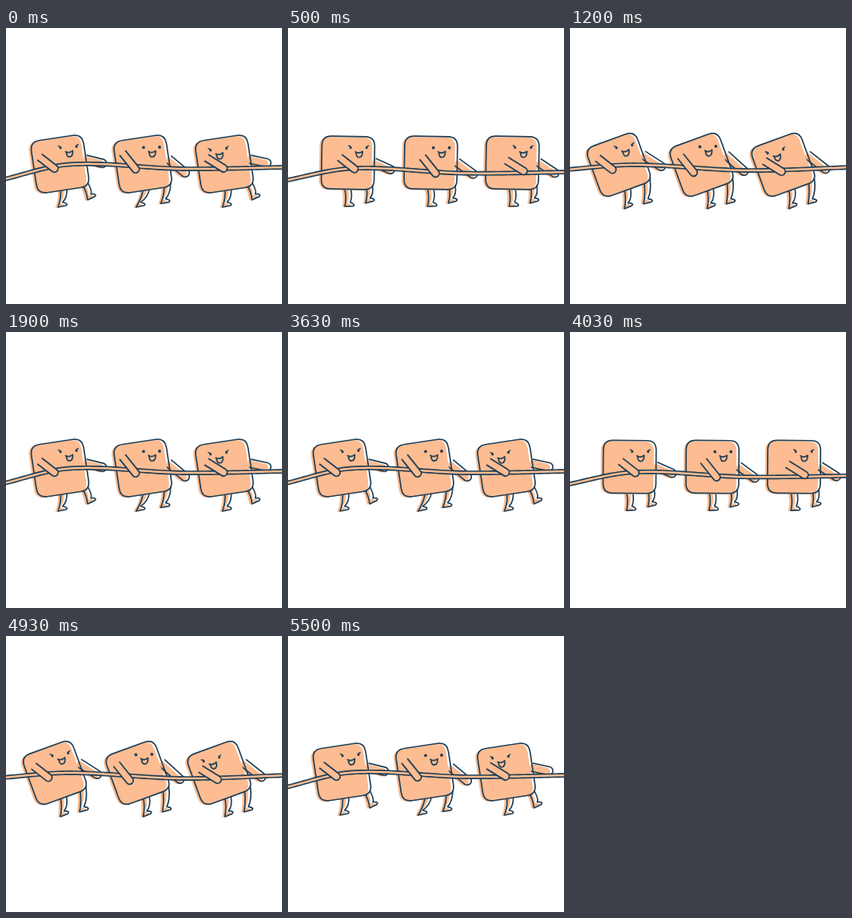
Recreate the animation shown at these times as an HTML page. Size 345 px wide and 345 px high, loop 7310 ms.

```html
<!DOCTYPE html>
<html lang="en">
<head>
<meta charset="utf-8">
<title>Tug of war</title>
<style>
html, body { margin: 0; width: 100%; height: 100%; overflow: hidden; background: #fff; }
svg { display: block; width: 100vw; height: 100vh; }
path { stroke-linecap: round; stroke-linejoin: round; }
.line { fill: none; stroke: #203f56; stroke-width: 1.7; }
.brow { fill: none; stroke: #203f56; stroke-width: 1.5; }
.fill { fill: #fdbc91; }
.arm { fill: #fdbc91; stroke: #203f56; stroke-width: 1.8; }
.dot { fill: #203f56; }
.rope { fill: none; stroke: #203f56; stroke-width: 5.8; }
.core { fill: none; stroke: #fdbc91; stroke-width: 2.5; }
</style>
</head>
<body>
<svg id="stage" viewBox="0 0 345 345"></svg>
<script>
const LOOP = 7310, STARTS = [30, 3630], PULL = 1870;

// reach: front hand ahead of the body; look: head turned back; lift: rear foot kicked up
const REST = { x: 67.5, y: 170, tilt: -8.5, reach: -7, look: 1, lift: 1, smile: 1,
  heels: [65, 224, 94, 218], rope: [191, 170.5, 176, 174] };
const FORWARD = { x: 75, y: 168.5, tilt: 1, reach: 8, look: 0, lift: 0, smile: 1,
  heels: [71, 223, 97, 219], rope: [192, 175.5, 181.5, 180] };
const TURN = { x: 66.5, y: 170, tilt: -6.5, reach: 1, look: 0.4, lift: 0, smile: 0,
  heels: [69, 225, 94, 219], rope: [186, 173, 180, 177.5] };
const LEAN = { x: 61, y: 171, tilt: -20, reach: -8, look: 0.95, lift: 0, smile: 1,
  heels: [68, 226, 92, 220], rope: [177.5, 171, 178, 174] };
const TIMES = [0, 470, 840, 1170, 1300, PULL];
const POSES = [REST, FORWARD, TURN, LEAN, LEAN, REST];
const ROPE_X = [-10, 80, 220, 355];

const CREW = [
  { x: 0, brows: true, gaze: 0, turn: 0.5, kick: 1, raise: 2, extra: 0, drop: 1, arm: [18, 14] },
  { x: 103.5, brows: false, gaze: 0, turn: 0.1, kick: -0.5, raise: -4, extra: -2, drop: 2, arm: [16, 20] },
  { x: 205.5, brows: true, gaze: 18, turn: 0.7, kick: 1, raise: 7, extra: 6, drop: -2, arm: [21, 13] }
];

const stage = document.getElementById('stage');
function add(tag, cls, parent = stage, attrs = {}) {
  const el = document.createElementNS('http://www.w3.org/2000/svg', tag);
  if (cls) el.setAttribute('class', cls);
  for (const k in attrs) el.setAttribute(k, attrs[k]);
  parent.appendChild(el);
  return el;
}
const set = (el, k, v) => el.setAttribute(k, v);

// An outline whose colour is printed slightly off to the left
function offset(parent) {
  const fill = add('path', 'fill', parent, { transform: 'translate(-3.4 1)' });
  const line = add('path', 'line', parent);
  return d => { set(fill, 'd', d); set(line, 'd', d); };
}

function spin(x, y, deg) {
  const a = deg * Math.PI / 180, c = Math.cos(a), s = Math.sin(a);
  return [x * c - y * s, x * s + y * c];
}

// Cubic curve through points, with the slope at each point given by a rule
function spline(xs, ys, x, slope) {
  let i = 0;
  while (i < xs.length - 2 && x > xs[i + 1]) i++;
  const h = xs[i + 1] - xs[i], u = (x - xs[i]) / h, w = 1 - u;
  return ys[i] * (1 + 2 * u) * w * w + ys[i + 1] * u * u * (3 - 2 * u)
    + h * (slope(xs, ys, i) * u * w * w - slope(xs, ys, i + 1) * u * u * w);
}
const rate = (xs, ys, a, b) => (ys[b] - ys[a]) / (xs[b] - xs[a]);

// Rests at every extreme, so motion never overshoots
function easy(xs, ys, i) {
  if (i === 0 || i === xs.length - 1) return 0;
  const a = rate(xs, ys, i - 1, i), b = rate(xs, ys, i, i + 1);
  return a * b > 0 ? 2 * a * b / (a + b) : 0;
}
const loose = (xs, ys, i) => rate(xs, ys, Math.max(0, i - 1), Math.min(xs.length - 1, i + 1));

function poseAt(t) {
  const mix = get => spline(TIMES, POSES.map(get), t, easy);
  const pose = {};
  for (const k in REST)
    pose[k] = Array.isArray(REST[k]) ? REST[k].map((_, j) => mix(p => p[k][j])) : mix(p => p[k]);
  return pose;
}

function capsule(x, y, X, Y, r) {
  const len = Math.hypot(X - x, Y - y), nx = (Y - y) / len * r, ny = (x - X) / len * r;
  return `M${x + nx} ${y + ny}L${X + nx} ${Y + ny}A${r} ${r} 0 0 1 ${X - nx} ${Y - ny}L${x - nx} ${y - ny}`;
}

function leg(hx, hy, fx, fy, a) {
  const at = (x, y) => { const p = spin(x, y, a); return `${fx + p[0]} ${fy + p[1]}`; };
  const kx = (hx + fx) / 2, ky = (hy + fy) / 2;
  return `M${hx - 4} ${hy}Q${kx + 1} ${ky} ${at(0, 0)}L${at(10, 0)}` +
    `Q${at(13, -1)} ${at(10.5, -3)}L${at(7, -5)}Q${kx + 8} ${ky} ${hx + 4} ${hy}`;
}

const BODY = 'M-21-33H21Q33-33 33-21V21Q33 33 21 33H-21Q-33 33-33 21V-21Q-33-33-21-33Z';

const actors = CREW.map(c => {
  const g = add('g');
  const legs = [offset(g), offset(g)], back = offset(g);
  const bodyFill = add('path', 'fill', g, { d: BODY });
  const body = add('path', 'line', g, { d: BODY });
  const face = add('g', '', g);
  for (const side of [-1, 1]) {
    const x = side * 10 - 0.5;
    add('circle', 'dot', face, { cx: x, cy: -7, r: c.brows ? 1.5 : 1.9 });
    if (c.brows) add('path', 'brow', face, { d: `M${x + side * 2.4}-9.6L${x - side * 0.6}-8` });
  }
  return { ...c, legs, back, bodyFill, body, face, mouth: add('path', 'line', face) };
});
const rope = add('path', 'rope'), core = add('path', 'core');
for (const a of actors) a.front = add('path', 'arm');

function drawActor(a, pose, ropeY) {
  const { tilt, lift } = pose, bx = pose.x + a.x, by = pose.y;
  const on = (x, y) => { const p = spin(x, y, tilt); return [bx + p[0], by + p[1]]; };

  const [x1, y1, x2, y2] = pose.heels, kick = lift * a.kick;
  a.legs[0](leg(...on(0, 31), a.x + x1 + (kick - lift) * 4, y1, tilt - 3));
  a.legs[1](leg(...on(27, 28), a.x + x2 + kick * 8, y2 - kick * 3, -15 - kick * 11));

  const kx = bx + 53, ky = ropeY(kx) + 1 - lift * a.raise;
  a.back(capsule(...on(33, -1), kx, ky, 5.2));

  set(a.bodyFill, 'transform', `translate(${bx - 3} ${by + 1}) rotate(${tilt})`);
  set(a.body, 'transform', `translate(${bx} ${by}) rotate(${tilt})`);

  const [mx, my] = on(13.5 - a.gaze * pose.look, -12);
  set(a.face, 'transform', `translate(${mx} ${my}) rotate(${tilt * a.turn})`);
  const open = a.gaze ? pose.smile : 1, low = 5 * open;
  set(a.mouth, 'd', `M-4.5-2Q0 ${3 - 2 * open} 4.5-2.5` +
    (open > 0.05 ? `Q4.5 ${low} 0 ${low}Q-3.5 ${low}-3.7-1.6` : ''));

  const hx = bx + pose.reach + a.extra, hy = ropeY(hx) + a.drop - tilt * 0.2;
  set(a.front, 'd', capsule(hx - a.arm[0], hy - a.arm[1], hx, hy, 4.6));
}

function draw(ms) {
  const t = ms % LOOP, start = t < STARTS[1] ? STARTS[0] : STARTS[1];
  const pose = poseAt(Math.min(PULL, Math.max(0, t - start)));
  const ropeY = x => spline(ROPE_X, pose.rope, x, loose);
  for (const a of actors) drawActor(a, pose, ropeY);
  let d = 'M';
  for (let x = -10; x <= 355; x += 5) d += ` ${x} ${ropeY(x)}`;
  set(rope, 'd', d);
  set(core, 'd', d);
}

const begin = performance.now();
function tick() {
  draw(performance.now() - begin);
  requestAnimationFrame(tick);
}
tick();
</script>
</body>
</html>
```
